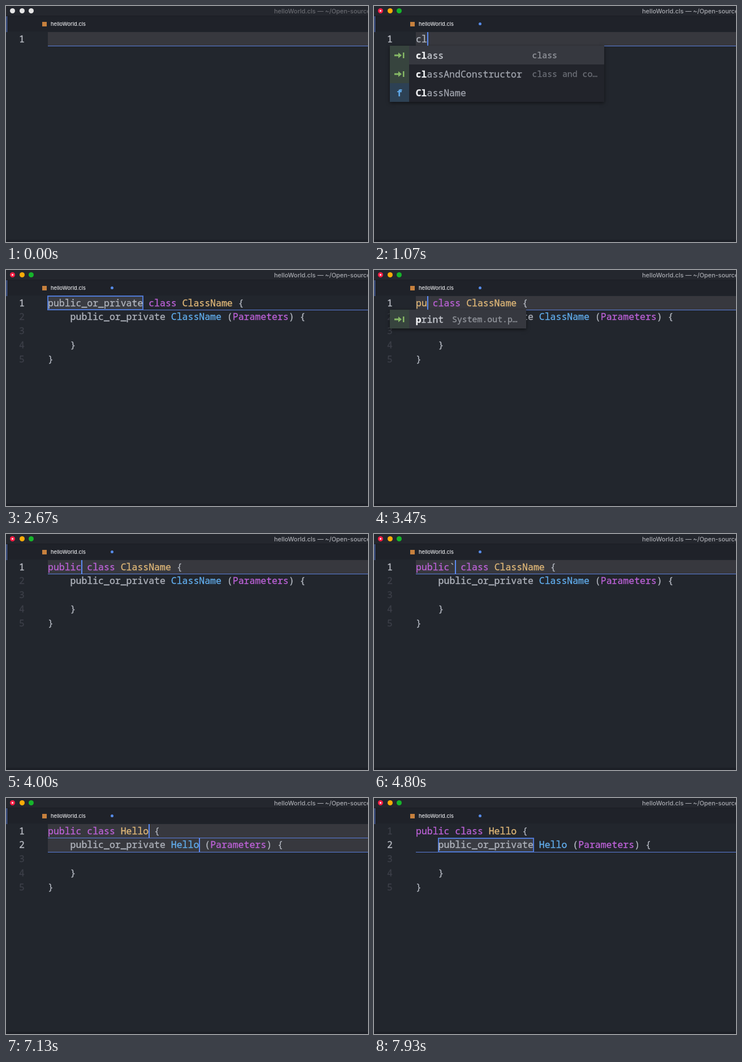
These frames come from a looping animation (640 px wide and 416 px high, 8 s). An HTML page:

```html
<!DOCTYPE html>
<html lang="en">
<head>
<meta charset="utf-8">
<title>Snippet demo</title>
<style>
  html, body { margin: 0; width: 100%; height: 100%; overflow: hidden; background: #22262d; }
  #stage { position: relative; width: 640px; height: 416px; overflow: hidden; background: #22262d;
    font: 500 16.5px/24.75px "Noto Sans Mono", "DejaVu Sans Mono", monospace; color: #b1b5be; font-variant-ligatures: none; }
  #stage div, #stage i, #stage svg { position: absolute; white-space: pre; box-sizing: border-box; font-style: normal; }
  .ui { font-family: Inter, Roboto, sans-serif; font-weight: 500; line-height: 18px; }
  #titlebar { left: 0; top: 0; width: 640px; height: 18px; background: #24272e; border-bottom: 1px solid #1b1d23; }
  #title { left: 474px; top: 0; font-size: 10.9px; }
  .light { top: 4px; width: 9px; height: 9px; border-radius: 50%; }
  #dot { left: 10px; top: 7px; width: 3px; height: 3px; border-radius: 50%; background: #fff; }
  #tabs { left: 0; top: 18px; width: 640px; height: 27px; background: #1f2229; }
  #marker { left: 1px; top: 18px; width: 1px; height: 28px; background: #5b80e0; }
  #icon { left: 64px; top: 28px; width: 8px; height: 8px; background: #c6803d; }
  #name { left: 79px; top: 23px; font-size: 9.2px; color: #e3e4e7; }
  #dirty { left: 184.5px; top: 29px; width: 5px; height: 5px; border-radius: 50%; background: #568be8; }
  #foot { left: 0; top: 412px; width: 640px; height: 4px; background: #1c1f26; }
  #editor { -webkit-text-stroke: .3px; }
  .num { left: 0; width: 33px; text-align: right; color: #3c3f48; }
  .num.on { color: #b9bcc4; }
  .row { left: 74px; width: 566px; height: 24.75px; border-bottom: 1px solid #5b7edb; }
  .row.fill { background-color: #37383e; }
  .sel { height: 26px; border: 2px solid #4f78d3; background: #3a3c43; }
  .caret { width: 2px; height: 24px; background: #5c8bf2; }
  .k { color: #bd62d8; } .c { color: #e0b878; } .f { color: #62aeee; }
  #popup { left: 28px; top: 70px; background: #22242b; box-shadow: 0 2px 6px #0008; }
  .item { left: 0; width: 100%; height: 33px; line-height: 33px; color: #a1a5ae; }
  .item.on { background: #36383f; color: #c9ccd3; }
  .item b { color: #f2f3f5; font-weight: 700; }
  .word { left: 45.7px; top: 0; }
  .hint { top: 0; color: #6c6f77; font-size: 14.85px; }
  .on .hint { color: #94979e; }
  .badge { left: 0; top: 0; width: 34px; height: 33px; background: #37443e; text-align: center; font-weight: 700; color: #60aaea; }
  .badge.fn { background: #2d4154; }
  .badge svg { left: 7px; top: 10px; }
</style>
</head>
<body>
<div id="stage">
  <div id="titlebar"></div>
  <div id="title" class="ui">helloWorld.cls — ~/Open-source</div>
  <div class="light" style="left:7px"></div>
  <div class="light" style="left:23.5px"></div>
  <div class="light" style="left:40px"></div>
  <div id="dot"></div>
  <div id="tabs"></div><div id="marker"></div><div id="icon"></div>
  <div id="name" class="ui">helloWorld.cls</div>
  <div id="dirty"></div>
  <div id="editor"></div>
  <div id="foot"></div>
</div>
<script>
const LOOP = 8000, CHAR = 9.9, LINE = 24.75, LEFT = 74, TOP = 45.5;
const FOCUS = 470, BLINK = 400;
const PLACEHOLDER = 'public_or_private';
const $ = id => document.getElementById(id);
const span = (cls, text) => `<span class="${cls}">${text}</span>`;
const colX = col => LEFT + col * CHAR;
const rowY = row => TOP + row * LINE;

// Snippet body with the given modifier and class name
const body = (modifier, name) => [
  `${modifier} ${span('k', 'class')} ${span('c', name)} {`,
  `    ${PLACEHOLDER} ${span('f', name)} (${span('k', 'Parameters')}) {`,
  '', '    }', '}'
];

const classList = (match, active) => ({ match, active, width: 379, hintX: 251.5, items: [
  ['class', 'class'], ['classAndConstructor', 'class and co…'], ['ClassName', '', true]] });
const printList = { match: 1, active: 0, width: 241, hintX: 110, items: [['print', 'System.out.p…']] };

// carets: [row, col]; sels: [row, col, length]
const steps = [];
const add = (at, lines, carets, extra = {}) =>
  steps.push({ at, lines, carets, sels: [], typed: at, ...extra });

add(0, [''], [[0, 0]]);
[930, 1070, 1200, 1330, 1530].forEach((at, i) => {
  const text = 'class'.slice(0, i + 1);
  add(at, [i < 4 ? text : span('k', text)], [[0, i + 1]], { popup: classList(i + 1, 0) });
});
add(1800, [span('k', 'class')], [[0, 5]], { popup: classList(5, 1), typed: 1530 });
add(2470, body(PLACEHOLDER, 'ClassName'), [], { sels: [[0, 0, 17]] });
[3270, 3400, 3600, 3730, 3870, 4000].forEach((at, i) => {
  const text = 'public'.slice(0, i + 1);
  add(at, body(span(i < 5 ? 'c' : 'k', text), 'ClassName'), [[0, i + 1]], { popup: i < 2 ? printList : null });
});
add(4600, body(span('k', 'public') + '`', 'ClassName'), [[0, 7]]);
add(5130, body(span('k', 'public'), 'ClassName'), [[0, 6]]);
add(5530, body(span('k', 'public'), 'ClassName'), [], { sels: [[0, 13, 9], [1, 22, 9]] });
[6270, 6470, 6670, 6800, 7000].forEach((at, i) =>
  add(at, body(span('k', 'public'), 'Hello'.slice(0, i + 1)), [[0, 14 + i], [1, 23 + i]]));
add(7670, body(span('k', 'public'), 'Hello'), [], { sels: [[1, 4, 17]] });

const arrow = '<svg width="20" height="14"><path d="M1 5.5h7V2l6 5-6 5V8.5H1zM16 2h2.5v10H16z" fill="#86b866"/></svg>';

function popupHTML({ match, active, width, hintX, items }) {
  const rows = items.map(([word, hint, fn], i) =>
    `<div class="item ${i === active ? 'on' : ''}" style="top:${i * 33}px">` +
    `<div class="badge ${fn ? 'fn' : ''}">${fn ? 'f' : arrow}</div>` +
    `<div class="word"><b>${word.slice(0, match)}</b>${word.slice(match)}</div>` +
    `<div class="hint" style="left:${hintX}px">${hint}</div></div>`).join('');
  return `<div id="popup" style="width:${width}px;height:${items.length * 33}px">${rows}</div>`;
}

function editorHTML({ lines, carets, sels, popup }, caretOn) {
  const rows = [...carets, ...sels].map(([row]) => row);
  const edge = row => `<div class="row ${carets.length ? 'fill' : ''}" style="top:${rowY(row) + .7}px"></div>`;
  const box = ([row, col, len]) =>
    `<div class="sel" style="left:${colX(col) - 1}px;top:${rowY(row) - .5}px;width:${len * CHAR + 2}px"></div>`;
  const text = (line, row) =>
    `<div class="num ${rows.includes(row) ? 'on' : ''}" style="top:${rowY(row)}px">${row + 1}</div>` +
    `<div style="left:${LEFT}px;top:${rowY(row)}px">${line}</div>`;
  const caret = ([row, col]) => `<div class="caret" style="left:${colX(col)}px;top:${rowY(row) + .7}px"></div>`;
  return rows.map(edge).join('') + sels.map(box).join('') + lines.map(text).join('') +
    (caretOn ? carets.map(caret).join('') : '') + (popup ? popupHTML(popup) : '');
}

const lights = [...document.querySelectorAll('.light')];
const lightColors = ['#fb1f46', '#fcab08', '#16b52b'];
const start = performance.now();
let shown = '';

function draw() {
  const t = (performance.now() - start) % LOOP;
  const index = steps.findLastIndex(step => step.at <= t);
  const step = steps[index];
  const focused = t >= FOCUS;
  const caretOn = focused && (t - (index ? step.typed : FOCUS)) % (2 * BLINK) < BLINK;
  const key = [index, focused, caretOn].join();
  if (key !== shown) {
    shown = key;
    $('editor').innerHTML = editorHTML(step, caretOn);
    $('title').style.color = focused ? '#a9abb1' : '#686a70';
    lights.forEach((light, i) => light.style.background = focused ? lightColors[i] : '#e6e6e7');
    $('dot').hidden = $('dirty').hidden = index === 0;
  }
  requestAnimationFrame(draw);
}
draw();
</script>
</body>
</html>
```
